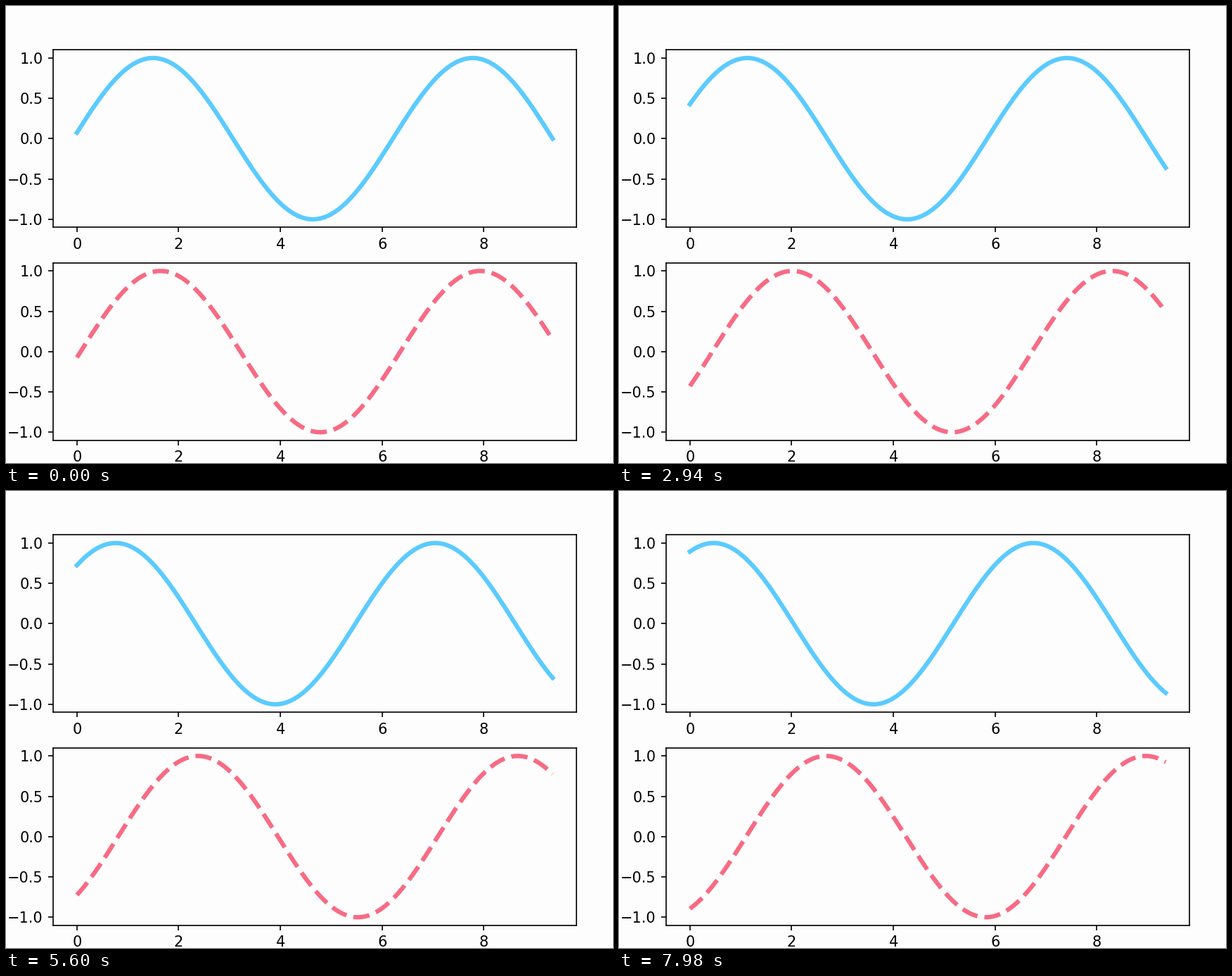
A matplotlib script that plays this animation: 863 by 649 pixels, repeating every 8 s.

```python
import numpy as np
import matplotlib.pyplot as plt
from matplotlib.animation import FuncAnimation

W, H, DPI = 863, 649, 150
PAPER = "#fdfdfd"
STEP = 3 * np.pi / 128      # sample spacing and phase shift per move
INTERVAL = 40
FRAMES = 8000 // INTERVAL
HOLD = 14                   # frames between two moves

plt.rcParams["font.family"] = "DejaVu Sans"

x = np.arange(128) * STEP
fig = plt.figure(figsize=((W + 1e-6) / DPI, (H + 1e-6) / DPI),
                 dpi=DPI, facecolor=PAPER)


def add_wave(top, color, style):
    """Add a panel at the given top edge in pixels; return its line."""
    height = 252
    ax = fig.add_axes([67 / W, (H - top - height) / H, 744 / W, height / H],
                      facecolor=PAPER)
    margin = 0.05 * x[-1]
    ax.set_xlim(-margin, x[-1] + margin)
    ax.set_ylim(-1.1, 1.1)
    ax.set_xticks(range(0, 9, 2))
    ax.set_yticks(np.linspace(-1, 1, 5))
    line, = ax.plot(x, np.sin(x), style, color=color, lw=3)
    return line


upper = add_wave(62.4, "#5bcbff", "-")
lower = add_wave(364.8, "#f76b84", "--")


def update(frame):
    phase = STEP * (1 + (frame + 1) // HOLD)
    upper.set_ydata(np.sin(x + phase))
    lower.set_ydata(np.sin(x - phase))
    return upper, lower


anim = FuncAnimation(fig, update, frames=FRAMES, interval=INTERVAL,
                     init_func=lambda: update(0), repeat=True, repeat_delay=0)

plt.show()
```
